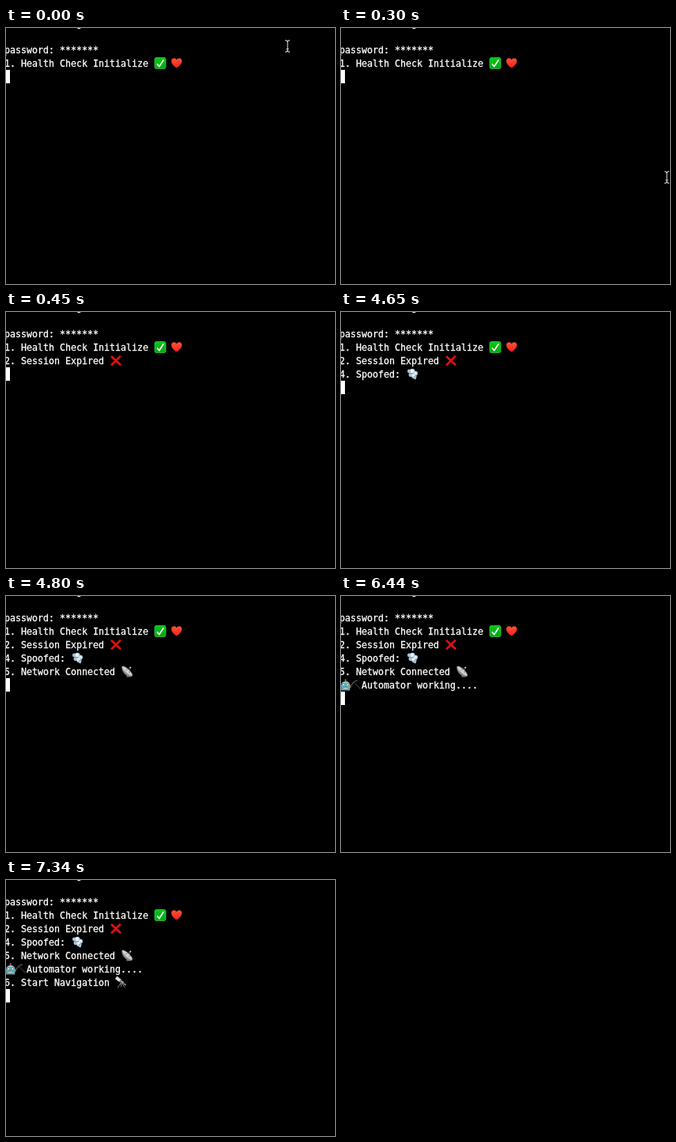
An HTML page for the animation above (8 s loop, 416 by 324 pixels).

```html
<!DOCTYPE html>
<html lang="en">
<head>
<meta charset="utf-8">
<title>Terminal session</title>
<style>
  html, body { margin: 0; width: 100%; height: 100%; overflow: hidden; background: #000; }
  svg { display: block; width: 416px; height: 324px; }
  text {
    font: 11.63px "DejaVu Sans Mono", "Liberation Mono", monospace;
    fill: #fff; stroke: #fff; stroke-width: .3px; white-space: pre;
  }
</style>
</head>
<body>
<svg viewBox="0 0 416 324">
  <defs>
    <linearGradient id="red" x1="0" y1="0" x2="0" y2="1">
      <stop offset="0" stop-color="#ff5138"/><stop offset="1" stop-color="#f0201c"/>
    </linearGradient>
    <linearGradient id="green" x1="0" y1="0" x2="0" y2="1">
      <stop offset="0" stop-color="#08c818"/><stop offset="1" stop-color="#00a810"/>
    </linearGradient>
    <!-- Icons sit in a 15 px square -->
    <g id="check">
      <rect x=".5" y=".5" width="14" height="14" rx="2" fill="url(#green)" stroke="#39d94a" stroke-width=".7"/>
      <path d="M3.4 8.4 6.3 11.6 11.8 3.2" fill="none" stroke="#fff" stroke-width="1.7"/>
    </g>
    <path id="heart" fill="url(#red)" d="M7.2 13.6C4.2 11.3.6 8.5.6 4.9.6 2.7 2 1.3 3.9 1.3c1.5 0 2.7.9 3.3 2.2.7-1.3 1.9-2.2 3.4-2.2 1.9 0 3.3 1.4 3.3 3.6 0 3.6-3.7 6.4-6.7 8.7z"/>
    <path id="cross" fill="none" stroke="#e01010" stroke-width="2.7" d="M1.5 2 13.6 13.2M13.4 1.6 1.6 13.4"/>
    <g id="puff">
      <g fill="#a9c3d6">
        <circle cx="3.3" cy="4" r="2.4"/><circle cx="7.2" cy="4.3" r="3.5"/>
        <circle cx="11.2" cy="6.6" r="2.9"/><circle cx="9.4" cy="10" r="3.2"/>
        <circle cx="5.2" cy="8.4" r="2.6"/><circle cx="10.6" cy="12.8" r="1.5"/>
      </g>
      <g fill="#e9f2f8">
        <circle cx="7" cy="3.9" r="2.3"/><circle cx="11" cy="6.2" r="1.7"/><circle cx="8.6" cy="9.2" r="2"/>
      </g>
      <path d="M4 6.3q2.4 1.5 4.6.2M9 11q2 0 2.6-2" fill="none" stroke="#6f8fa6" stroke-width=".8"/>
    </g>
    <g id="dish">
      <path d="M8.5 9.5 6.5 14.4H12.5L10.5 10z" fill="#6d7174"/>
      <path d="M1.2.9C-.2 5.6 4.2 12.2 9.8 13.8c2.2.6 3.8.2 4.8-.8z" fill="#85898c"/>
      <ellipse cx="7.8" cy="7" rx="8.6" ry="2.6" transform="rotate(43 7.8 7)" fill="#cfd2d4" stroke="#75797c" stroke-width=".5"/>
      <path d="M5.4 6.4 11.6 2.6 10.4 9.8" fill="none" stroke="#74787b" stroke-width=".7"/>
      <circle cx="11.8" cy="2.4" r="1" fill="#d8d8d8"/>
    </g>
    <g id="robot">
      <path d="M7.3 1V4" stroke="#8ba7ad" stroke-width="1"/>
      <circle cx="7.3" cy="1.4" r="1.2" fill="#d8483a"/>
      <path d="M.5 7.4h1.6v3.8H.5zM12.6 7.4h1.6v3.8h-1.6z" fill="#b9603a"/>
      <path d="M1.8 14.4V7.6Q2.2 3 7.3 3t5.5 4.6v6.8z" fill="#66b3bd"/>
      <path d="M4 4.7q3.3-1.4 6.6 0" stroke="#a5dbe0" fill="none"/>
      <g fill="#fff" stroke="#356b77" stroke-width=".7">
        <circle cx="4.8" cy="7.4" r="1.4"/><circle cx="9.9" cy="7.4" r="1.4"/>
      </g>
      <path d="M7.3 8.4 8 9.8H6.6z" fill="#d44936"/>
      <rect x="3.9" y="10.9" width="6.9" height="2" rx=".7" fill="#e5eeee" stroke="#356b77" stroke-width=".7"/>
    </g>
    <g id="pick" fill="none">
      <path d="M4 4.6 12 12.6" stroke="#5b4838" stroke-width="1"/>
      <path d="M1 8.4Q2 3 8.4 2" stroke="#5e6266" stroke-width="1.1"/>
    </g>
    <g id="scope">
      <path d="M7.4 8 3.2 14.4M7.6 8V13.4M8 8 12.6 14.4" fill="none" stroke="#8d9194" stroke-width=".9"/>
      <g transform="rotate(38 7.5 6.5)">
        <path d="M-.6 4.4h6.8v4H-.6z" fill="#d9dbdc"/>
        <path d="M6.2 4.9h5v3h-5z" fill="#a4a8ab"/>
        <path d="M11.2 5.4h4v2h-4z" fill="#777c80"/>
        <path d="M6.2 4.4v4M11.2 4.9v3" stroke="#45494c" stroke-width=".7"/>
      </g>
      <circle cx="7.6" cy="8" r="1" fill="#4d5154"/>
    </g>
    <path id="beam" fill="none" d="M-3-7.5Q-.5-7.5 0-5.5.5-7.5 3-7.5M0-5.5V5.5M-3 7.5Q-.5 7.5 0 5.5.5 7.5 3 7.5M-1.5 3.5H1.5"/>
  </defs>
  <rect width="416" height="324"/>
  <text x="89" y="-2">g</text>
  <g id="lines"></g>
  <rect id="block" x="-2" width="7" height="17" fill="#fff"/>
  <use id="mouse" href="#beam" stroke="#d8d8d8" stroke-width="1.1"/>
</svg>
<script>
const LOOP = 8000, ROW = 17, CELL = 7, LEFT = -2, TOP = 19;

// Each line: start time, text, first text column, icons as [name, x]
const lines = [
  [0, "password: *******", 0, []],
  [0, "1. Health Check Initialize", 0, [["check", 187.5], ["heart", 208.5]]],
  [450, "2. Session Expired", 0, [["cross", 131.5]]],
  [4650, "4. Spoofed:", 0, [["puff", 83]]],
  [4800, "5. Network Connected", 0, [["dish", 145.5]]],
  [6440, "Automator working....", 4, [["robot", -1.5], ["pick", 12.5]]],
  [7340, "6. Start Navigation", 0, [["scope", 138]]]
];

// Pointer stops: start time, x, y
const stops = [[0, 356, 23], [150, 331, 7], [300, 412, 189]];
const POINTER_END = 450;

const byId = id => document.getElementById(id);

function add(parent, tag, attrs, text = "") {
  const node = document.createElementNS("http://www.w3.org/2000/svg", tag);
  for (const key in attrs) node.setAttribute(key, attrs[key]);
  node.textContent = text;
  return parent.appendChild(node);
}

const rows = lines.map(([, text, col, icons], i) => {
  const top = TOP + i * ROW;
  const row = add(byId("lines"), "g", {});
  add(row, "text", { x: LEFT + col * CELL, y: top + 13 }, text);
  for (const [name, x] of icons) add(row, "use", { href: "#" + name, x, y: top + 1 });
  return row;
});

function draw(t) {
  let shown = 0;
  lines.forEach(([start], i) => {
    const on = t >= start;
    rows[i].setAttribute("visibility", on ? "visible" : "hidden");
    if (on) shown++;
  });
  byId("block").setAttribute("y", TOP + shown * ROW);

  const [, x, y] = stops.filter(stop => t >= stop[0]).pop();
  byId("mouse").setAttribute("transform", `translate(${x} ${y})`);
  byId("mouse").setAttribute("visibility", t < POINTER_END ? "visible" : "hidden");
}

const begin = performance.now();
function tick() {
  draw((performance.now() - begin) % LOOP);
  requestAnimationFrame(tick);
}
tick();
</script>
</body>
</html>
```
